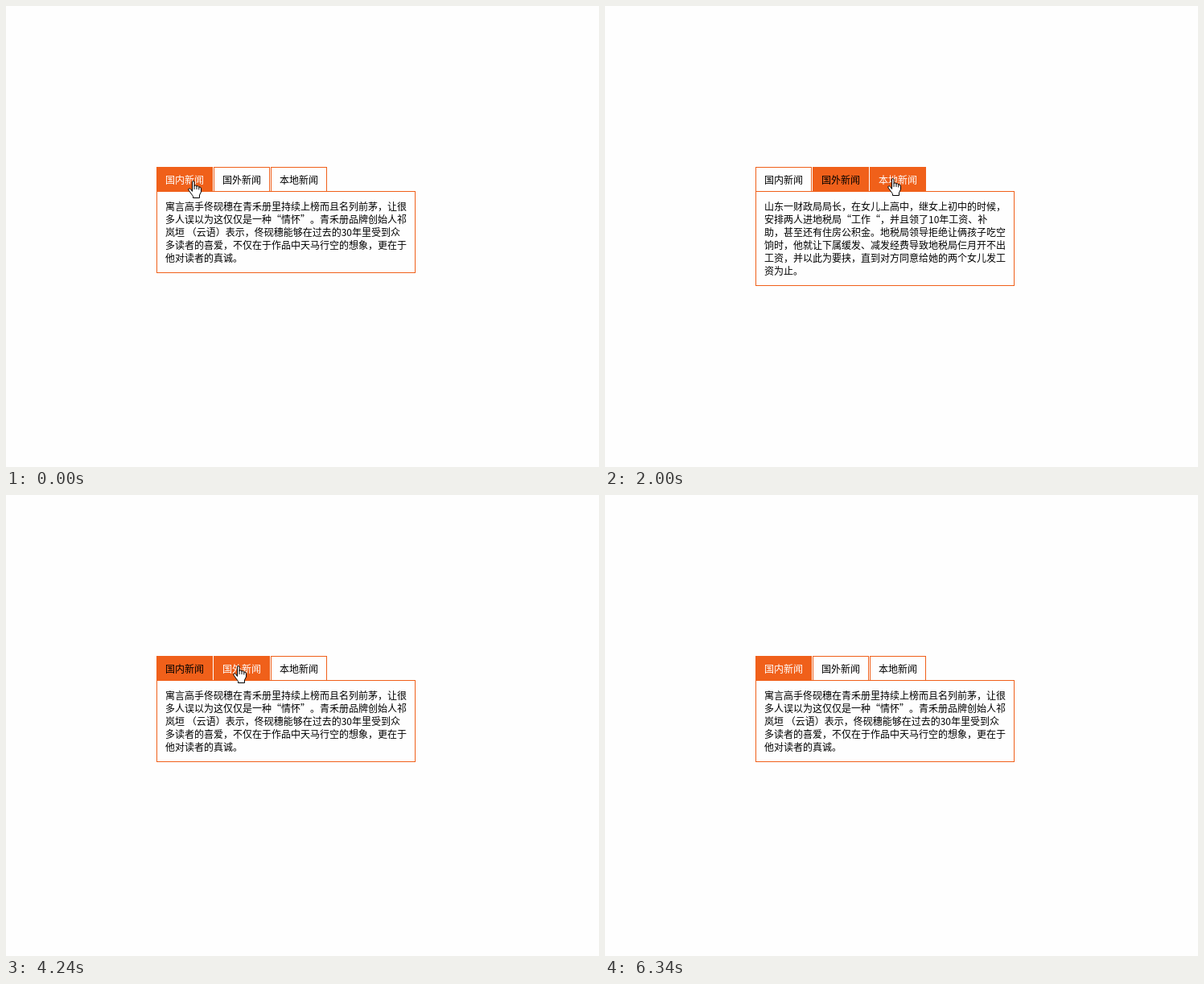
Animation, 737 px wide and 573 px high, one loop 7.19 s. Source, as an HTML page:

```html
<!DOCTYPE html>
<html lang="zh-CN">
<head>
<meta charset="utf-8">
<title>新闻选项卡</title>
<style>
  html, body { margin: 0; width: 100%; height: 100%; overflow: hidden; background: #fefefe; }
  svg { display: block; }
  text {
    font: 12px "Noto Sans CJK SC", "Noto Sans CJK", "Noto Sans CJK JP", sans-serif;
    font-kerning: none;
    text-spacing-trim: space-all;
    white-space: pre;
  }
  .box { fill: #fefefe; stroke: #f0601a; shape-rendering: crispEdges; }
  .on .box { fill: #f0601a; }
  .lit text { fill: #fff; font-weight: 500; }
  .cursor { fill: #fff; stroke: #000; stroke-linejoin: round; stroke-linecap: round; }
</style>
</head>
<body>
<svg width="737" height="573" viewBox="0 0 737 573">
  <g id="tabs"></g>
  <g id="panels"></g>
  <g id="hand" class="cursor">
    <path d="M5.5 13V2Q5.5.5 6.8.5T8 2V6.5Q9.5 5 11 7Q12.5 6 13.8 8Q16.5 7.5 16.5 10V14L14.5 18V21.5H6.5V19.5L1.2 12.2Q.2 10.6 1.3 10T3.5 10.6Z"/>
    <path fill="none" d="M8 6.5V10.5M11 7V10.5M13.8 8V11"/>
  </g>
  <path id="arrow" class="cursor" d="M.5.5V16L4 12.7 6.5 18.5 8.7 17.5 6.4 12H11.3Z"/>
</svg>
<script>
const LOOP = 7190, LEAVE = 5800, GONE = 6340;
const STEP = 125; // the pointer moves in jumps this many ms apart
const TAB = { x: 187, y: 200, width: 70, height: 31, pitch: 71 };
const LINE = 16;

const titles = ["国内新闻", "国外新闻", "本地新闻"];
const articles = [
  ["寓言高手佟砚穗在青禾册里持续上榜而且名列前茅，让很",
   "多人误以为这仅仅是一种“情怀”。青禾册品牌创始人祁",
   "岚垣 （云语）表示，佟砚穗能够在过去的30年里受到众",
   "多读者的喜爱，不仅在于作品中天马行空的想象，更在于",
   "他对读者的真诚。"],
  ["山东一财政局局长，在女儿上高中，继女上初中的时候，",
   "安排两人进地税局“工作“，并且领了10年工资、补",
   "助，甚至还有住房公积金。地税局领导拒绝让俩孩子吃空",
   "饷时，他就让下属缓发、减发经费导致地税局仨月开不出",
   "工资，并以此为要挟，直到对方同意给她的两个女儿发工",
   "资为止。"],
  ["半岛局势风起云涌，好不热闹，桥叔刚刚推送了朝核问题",
   "文章，分析各方介入之下，半岛能否迎来转机。"]
];

const origin = { x: 226, y: 217 };
const moves = [
  { at: 270, steps: 3, x: 272, y: 217 },
  { at: 1600, steps: 1, x: 310, y: 216 },
  { at: 1750, steps: 3, x: 351, y: 214 },
  { at: 2830, steps: 1, x: 308, y: 214 },
  { at: 2960, steps: 2, x: 232, y: 214 },
  { at: 3230, steps: 1, x: 219, y: 212 },
  { at: 3970, steps: 3, x: 282, y: 212 },
  { at: 4360, steps: 1, x: 330, y: 212 },
  { at: 4510, steps: 2, x: 348, y: 212 },
  { at: 4780, steps: 3, x: 209, y: 211 },
  { at: LEAVE, steps: 2, x: 357, y: 510 },
  { at: 6070, steps: 2, x: 567, y: 561 }
];
const clicks = [910, 2270, 3540]; // each opens the next tab in turn

const $ = id => document.getElementById(id);

function add(parent, tag, attrs, content = "") {
  const node = document.createElementNS("http://www.w3.org/2000/svg", tag);
  for (const key in attrs) node.setAttribute(key, attrs[key]);
  node.textContent = content;
  return parent.appendChild(node);
}

const box = (parent, x, y, width, height) =>
  add(parent, "rect", { class: "box", x: x + .5, y: y + .5, width: width - 1, height: height - 1 });

const tabs = titles.map((title, i) => {
  const tab = add($("tabs"), "g", {}), x = TAB.x + i * TAB.pitch;
  box(tab, x, TAB.y, TAB.width, TAB.height);
  add(tab, "text", { x: x + 11, y: TAB.y + 21 }, title);
  return tab;
});

const panels = articles.map(lines => {
  const panel = add($("panels"), "g", {}), top = TAB.y + TAB.height - 1;
  box(panel, TAB.x, top, 322, 22 + lines.length * LINE);
  lines.forEach((line, i) => add(panel, "text", { x: TAB.x + 11, y: top + 24 + i * LINE }, line));
  return panel;
});

const show = (node, visible) => node.setAttribute("display", visible ? "inline" : "none");

function pointerAt(t) {
  let { x, y } = origin;
  for (const move of moves) {
    if (t < move.at) break;
    const step = Math.floor((t - move.at) / STEP) + 1;
    const progress = Math.min(1, step / move.steps);
    x += (move.x - x) * progress;
    y += (move.y - y) * progress;
  }
  return { x: Math.round(x), y: Math.round(y) };
}

function render(t) {
  const { x, y } = pointerAt(t);
  const active = clicks.filter(at => at <= t).length % tabs.length;
  const fingertip = x + 6;
  const hovered = t < LEAVE ? Math.floor((fingertip - TAB.x) / TAB.pitch) : active;
  tabs.forEach((tab, i) => {
    tab.classList.toggle("on", i === active || i === hovered);
    tab.classList.toggle("lit", i === hovered);
  });
  panels.forEach((panel, i) => show(panel, i === active));
  for (const id of ["hand", "arrow"]) $(id).setAttribute("transform", `translate(${x} ${y})`);
  show($("hand"), t < LEAVE);
  show($("arrow"), t >= LEAVE && t < GONE);
}

const start = performance.now();
function tick() {
  render((performance.now() - start) % LOOP);
  requestAnimationFrame(tick);
}
tick();
</script>
</body>
</html>
```
